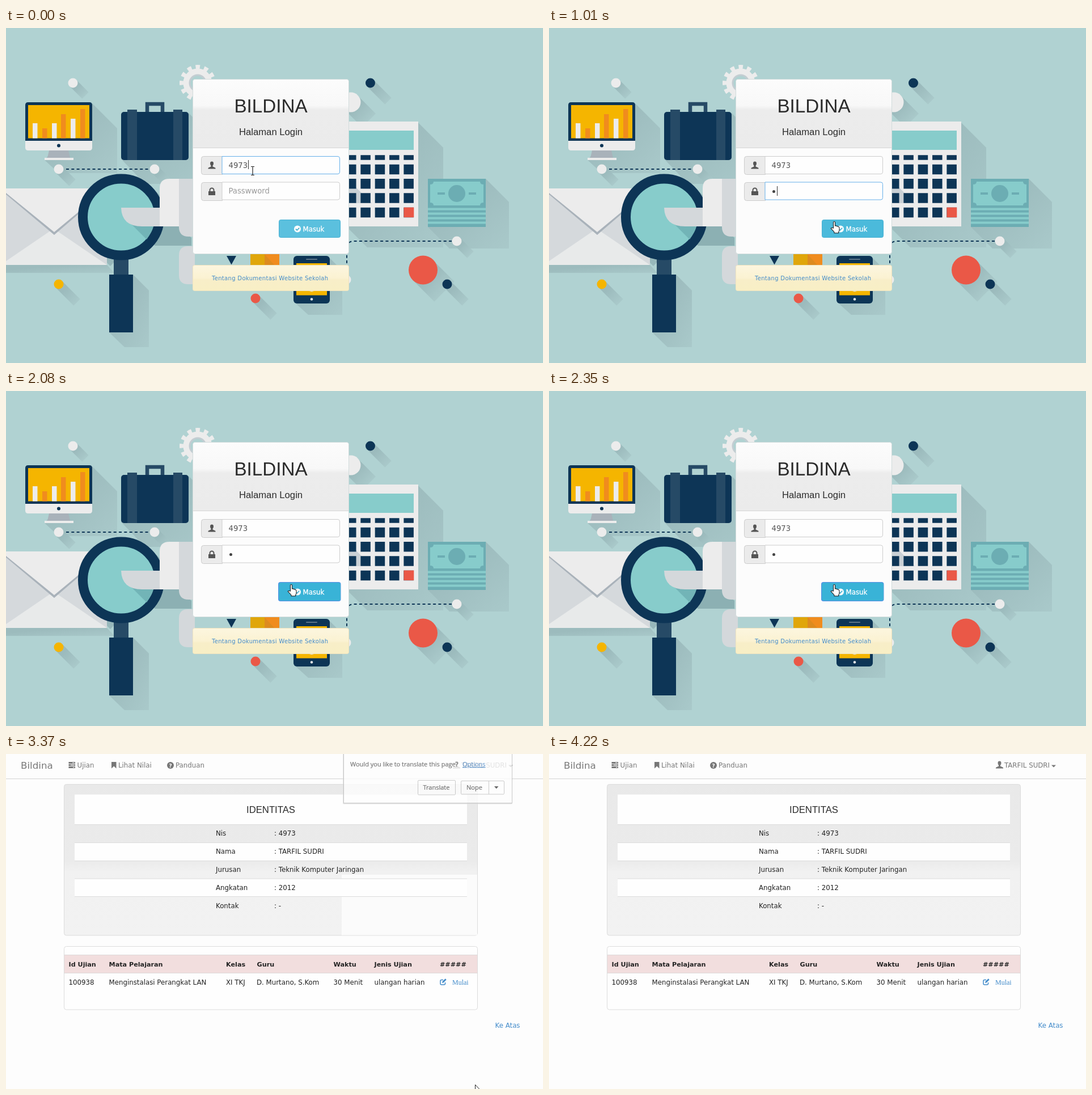
An HTML page that plays this animation: 947x591 px, repeating every 4350 ms.

```html
<!DOCTYPE html>
<html lang="id">
<head>
<meta charset="utf-8">
<title>Halaman Login</title>
<style>
html, body { margin: 0; width: 100%; height: 100%; overflow: hidden; background: #fdfdfd; }
svg { display: block; width: 947px; height: 591px; }
text { font: 11.8px "DejaVu Sans", Verdana, sans-serif; fill: #222; white-space: pre; }
.head { font-family: "Liberation Sans", Arial, sans-serif; text-anchor: middle; fill: #2b2b2b; }
.big { font-size: 33.2px; }
.sub { font-size: 16.7px; }
.field { font-size: 13.2px; fill: #555; }
.hint { fill: #999; }
.link, .link text { fill: #428bca; }
.foot { font-size: 10px; letter-spacing: .32px; }
.nav text { fill: #777; }
.nav .brand { font-size: 16.7px; }
.th text { font-weight: bold; font-size: 11.2px; }
.serif { font: 12px "Liberation Serif", Times, serif; }
.pop text { font: 11px "Open Sans", "Noto Sans", sans-serif; fill: #555; stroke: #555; stroke-width: .2; }
.pop .opt { fill: #4a86c5; stroke: #4a86c5; text-decoration: underline; }
.shade > * { fill: url(#shade); }
.shade .ln { fill: none; stroke: url(#shade); stroke-width: 16; }
.shade .lens { stroke: #97b8bb; stroke-width: 150; }
.box { fill: #fefefe; stroke: #ccc; }

/* every change is a hard cut on one shared clock */
.a { animation: 4350ms step-end infinite; }
.login { animation-name: login; }
.app { animation-name: app; }
.caret1 { animation-name: caret1; }
.caret2 { animation-name: caret2; }
.user { animation-name: user; }
.pass { animation-name: pass; }
.hint { animation-name: hint; }
.dot { animation-name: dot; }
.btn { animation-name: btn; }
.glow { animation-name: glow; }
.beam { animation-name: beam; }
.hand { animation-name: hand; }
.arrow { animation-name: arrow; }
.pop { animation-name: pop; }
.pale { animation-name: pale; }
@keyframes login { 0% { opacity: 1 } 60.45% { opacity: 0 } }
@keyframes app { 0% { opacity: 0 } 60.45% { opacity: 1 } }
@keyframes caret1 { 0% { opacity: 1 } 3.44% { opacity: 0 } }
@keyframes caret2 {
  0% { opacity: 0; transform: none }
  10.57% { opacity: 1; transform: none }
  16.78% { opacity: 1; transform: translate(9px, 0) }
  26.66% { opacity: 0; transform: none }
}
@keyframes user { 0% { stroke: #66afe9 } 10.57% { stroke: #a9c6dc } 13.33% { stroke: #ccc } }
@keyframes pass { 0% { stroke: #ccc } 10.57% { stroke: #7cb8e4 } 13.33% { stroke: #66afe9 } 32.18% { stroke: #a0c4d8 } 47.81% { stroke: #ccc } }
@keyframes hint { 0% { opacity: 1 } 16.78% { opacity: 0 } }
@keyframes dot { 0% { opacity: 0 } 16.78% { opacity: 1 } }
@keyframes btn { 0% { fill: #5bc0de } 23.21% { fill: #4bbadb } 26.66% { fill: #39b3d7 } }
@keyframes glow { 0% { opacity: 0 } 47.81% { opacity: 1 } }
@keyframes beam {
  0% { opacity: 1; transform: translate(435px, 252px) }
  10.57% { opacity: 1; transform: translate(437px, 253px) }
  16.78% { opacity: 0; transform: none }
  20.22% { opacity: 1; transform: translate(460px, 285px) }
  23.21% { opacity: 0; transform: none }
}
@keyframes hand { 0% { opacity: 0 } 23.21% { opacity: 1 } 67.58% { opacity: 0 } }
@keyframes arrow {
  0% { opacity: 0; transform: none }
  67.58% { opacity: 1; transform: translate(536px, 366px) }
  74.02% { opacity: 0; transform: none }
  77.47% { opacity: 1; transform: translate(827px, 583px) }
  80.22% { opacity: 1; transform: translate(845px, 579px) }
  84.59% { opacity: 1; transform: translate(890px, 590px) }
  87.81% { opacity: 0; transform: none }
}
@keyframes pop { 0% { opacity: 0 } 77.47% { opacity: .8 } 80.22% { opacity: 1 } 97.01% { opacity: 0 } }
@keyframes pale { 0% { opacity: 0 } 77.47% { opacity: 1 } 80.22% { opacity: 0 } }
</style>
</head>
<body>
<svg viewBox="0 0 947 591" xmlns="http://www.w3.org/2000/svg">
<defs>
  <linearGradient id="shade" x1="0" y1="0" x2="1" y2="1">
    <stop offset=".3" stop-color="#9cbbbd"/><stop offset="1" stop-color="#a9c9ca"/>
  </linearGradient>
  <linearGradient id="cardHead" x2="0" y2="1">
    <stop stop-color="#fcfcfc"/><stop offset=".38" stop-color="#f8f8f8"/><stop offset=".45" stop-color="#ececec"/><stop offset="1" stop-color="#ebebeb"/>
  </linearGradient>
  <linearGradient id="note" x2="0" y2="1">
    <stop stop-color="#fcf6df"/><stop offset=".5" stop-color="#fbf2d2"/><stop offset=".58" stop-color="#f8eec8"/><stop offset="1" stop-color="#f8efc5"/>
  </linearGradient>
  <linearGradient id="well" x2="0" y2="1">
    <stop stop-color="#e9e9e9"/><stop offset=".51" stop-color="#ebebeb"/><stop offset=".58" stop-color="#f1f1f1"/><stop offset="1" stop-color="#f2f2f2"/>
  </linearGradient>
  <path id="person" d="M-3-3.5a3 3.4 0 0 1 6 0Q3-1 1.5.5V2L6 4q.6.4.6 2H-6.6q0-1.6.6-2l4.5-2V.5Q-3-1-3-3.5z"/>
</defs>

<g class="a login">
  <rect width="947" height="591" fill="#b0d2d2"/>

  <g class="shade">
    <path d="M152 133L196 177V256H93L68 233z"/>
    <path d="M322 150l42 42v83H245L203 231z"/>
    <path d="M0 418H178l13 14H0z"/>
    <path d="M224 435l28 28v100h-43L182 537z"/>
    <path d="M727 167l44 44v176H637l-37-37z"/>
    <path d="M846 266l41 41v82H782l-38-38z"/>
    <path d="M571 406l22 22v78h-60l-22-20z"/>
    <path class="ln" d="M118 97l22 22"/>
    <path class="ln" d="M93 249l24 24"/>
    <path class="ln" d="M262 249l24 24"/>
    <path class="ln" d="M642 97l32 32"/>
    <path class="ln" d="M93 452l32 32"/>
    <path class="ln" d="M440 477l32 32"/>
    <path class="ln" d="M778 452l32 32"/>
    <path class="ln" d="M795 376l24 24"/>
    <path class="ln" d="M735 427l38 38" style="stroke-width:50"/>
    <path class="ln" d="M608 131l32 32" style="stroke-width:34"/>
    <path class="ln lens" d="M203 333l34 34"/>
  </g>

  <!-- dashed links and dots -->
  <g fill="none" stroke="#0d3556" stroke-width="2" stroke-dasharray="5 4.3">
    <path d="M106 249H256"/>
    <path d="M786 376H612Q601 377 601 390V444"/>
  </g>
  <g fill="#ececec">
    <circle cx="118" cy="97" r="8.5"/><circle cx="93" cy="249" r="8.5"/><circle cx="262" cy="249" r="8.5"/>
    <circle cx="795" cy="376" r="8.5"/><circle cx="600" cy="444" r="8.5"/><circle cx="608" cy="131" r="17.5"/>
  </g>
  <g fill="#0d3556"><circle cx="642.5" cy="97" r="8.5"/><circle cx="778" cy="452" r="8.5"/></g>
  <g fill="#ea5847"><circle cx="440" cy="477" r="8.5"/><circle cx="735.5" cy="427" r="25.5"/></g>
  <circle cx="93" cy="452" r="8.5" fill="#f5b500"/>

  <!-- gear -->
  <g fill="none" stroke="#ececec">
    <circle cx="338" cy="97" r="20" stroke-width="11"/>
    <circle cx="338" cy="97" r="28" stroke-width="8" stroke-dasharray="7.33" transform="rotate(-7.5 338 97)"/>
    <circle cx="338" cy="97" r="14" stroke="#c3cdd2" stroke-width="3"/>
  </g>

  <!-- monitor -->
  <path d="M34 199v-63q0-5 5-5H147q5 0 5 5v63z" fill="#0d3556"/>
  <rect x="39" y="136" width="108" height="58.5" fill="#f5b500"/>
  <path d="M47 168h8.5v26.5H47zM81 168h8.5v26.5H81zM114 160h8.5v34.5H114z" fill="#ececec"/>
  <path d="M64 177h8.5v17.5H64zM97 152h8.5v42.5H97zM131 143h8.5v51.5H131z" fill="#f08c1e"/>
  <path d="M34 199H152v12q0 5-5 5H39q-5 0-5-5z" fill="#ececec"/>
  <circle cx="93" cy="207.5" r="3" fill="#0d3556"/>
  <path d="M76 216h34l3 13H73z" fill="#a9b2ba"/>
  <rect x="68" y="229" width="51" height="4" fill="#ececec"/>

  <!-- briefcase -->
  <path d="M249 150V134h27v16" fill="none" stroke="#264a66" stroke-width="6.5"/>
  <rect x="203" y="148" width="119" height="85" rx="5" fill="#0d3556"/>
  <path d="M214 144h17v89h-17zM295 144h16v89h-16z" fill="#264a66"/>

  <!-- envelope -->
  <path d="M0 283H178V418H0z" fill="#d5d9dc"/>
  <path d="M-10 418L84 354l94 64z" fill="#e8eaea"/>
  <path d="M-10 285H178L85 365z" fill="#a9b2ba"/>
  <path d="M-10 283H178L85 360z" fill="#ececec"/>

  <!-- magnifier and hand -->
  <path d="M255 350h50l22 20v14H262z" fill="#8cb0b3"/>
  <rect x="190" y="405" width="26" height="31" fill="#264a66"/>
  <rect x="182" y="435" width="42" height="102" fill="#0d3556"/>
  <circle cx="203" cy="333.5" r="67.5" fill="#87cccb" stroke="#0d3556" stroke-width="17"/>
  <path d="M212 337L248 373Q259 358 261 346z" fill="#72b4b7"/>
  <path d="M203 317h68v33h-31q-36 0-37-33z" fill="#d4d8db"/>
  <path d="M271 350V283q0-17 17-17h42v84z" fill="#ececec"/>
  <path d="M305 266h28v102h-11q-17 0-17-17z" fill="#d4d8db"/>
  <path d="M333 385h-12q-16 0-16 16v35q0 16 16 16h12z" fill="#d4d8db"/>

  <!-- pencil, book, phone -->
  <path d="M389 402h17l-8.500 15.500z" fill="#0d3556"/>
  <path d="M431 396h51v24h-51z" fill="#f5b500"/>
  <path d="M456 396h26v24h-26z" fill="#f08c1e"/>
  <path d="M431 396h22l22 24h-44z" fill="#b88a20" opacity=".35"/>
  <rect x="507" y="402" width="64" height="84" rx="6" fill="#0d3556"/>
  <rect x="512" y="415" width="54" height="56.5" fill="#f5b500"/>
  <rect x="529" y="407" width="20" height="2" rx="1" fill="#5c7488"/>
  <circle cx="539" cy="456" r="9" fill="#ececec"/><circle cx="539" cy="478.5" r="2.3" fill="#ececec"/>

  <!-- calculator -->
  <path d="M590 165H727V350H590z" fill="#ececec"/>
  <path d="M590 181H719V215H590z" fill="#87cccb"/>
  <path d="M604 268L645 309H604z" fill="#c9d0d5"/>
  <g stroke="#0d3556" stroke-width="17.5" stroke-dasharray="17.5 7.85">
    <path d="M600 228.500H719.500" stroke-width="8.5"/>
    <path d="M600 249.500H719.500M600 274.800H719.500M600 300H719.500M600 325.500H719.500"/>
  </g>
  <rect x="701.5" y="316.5" width="17.8" height="17.5" fill="#ea5847"/>
  <path d="M600 264l10 11h-10z" fill="#0d3556"/>

  <!-- banknotes -->
  <path d="M744 266H846v85H744z" fill="#6cadb3"/>
  <path d="M754 271h82q0 5 6 5v32q-6 0-6 5h-82q0-5-6-5v-32q6 0 6-5z" fill="#87cccb"/>
  <circle cx="795" cy="292" r="15" fill="#6cadb3"/>
  <path d="M761 292h13M816 292h13" stroke="#6cadb3" stroke-width="4"/>
  <path d="M744 319.500H846M744 327.500H846M744 335.500H846M744 343.500H846" stroke="#87cccb" stroke-width="4"/>

  <!-- login card -->
  <rect x="329.5" y="90.5" width="275" height="308" rx="4" fill="#fcfcfc" stroke="#d2dcdc"/>
  <path d="M330 211V95q0-4 4-4H600q4 0 4 4V211z" fill="url(#cardHead)"/>
  <path d="M330 211.500H604" stroke="#d6d6d6"/>
  <text class="head big" x="467" y="149">BILDINA</text>
  <text class="head sub" x="467" y="189">Halaman Login</text>

  <path d="M381.500 226.500h-33q-4 0-4 4v24q0 4 4 4h33zM381.500 272.500h-33q-4 0-4 4v24q0 4 4 4h33z" fill="#ebebeb" stroke="#ccc"/>
  <path class="a box user" d="M381 226.500H585q3.500 0 3.500 3.500v24q0 3.500-3.500 3.500H381z"/>
  <path class="a box pass" d="M381 272H585q3.500 0 3.500 3.500v24q0 3.500-3.500 3.500H381z"/>
  <use href="#person" x="363" y="242.5" fill="#555"/>
  <path d="M357 288h12v7h-12z" fill="#555"/>
  <path d="M359.500 289v-3a3.500 3.500 0 0 1 7 0v3" fill="none" stroke="#555" stroke-width="2"/>
  <text class="field" x="392.5" y="246.5">4973</text>
  <path class="a caret1" d="M427.500 233v16" stroke="#333"/>
  <text class="a field hint" x="392.5" y="292">Passwword</text>
  <circle class="a dot" cx="396.5" cy="288.5" r="2.5" fill="#444"/>
  <path class="a caret2" d="M393.500 279v17" stroke="#333"/>

  <rect class="a glow" x="480" y="337" width="110.5" height="34" rx="4" fill="#4d90e8"/>
  <rect class="a btn" x="481.5" y="338.5" width="108" height="31" rx="3" stroke="#46b0d2"/>
  <circle cx="514" cy="354.5" r="6" fill="#fff"/>
  <path d="M511 354.500l2.300 2.300 4-4.300" fill="none" stroke="#45b0d0" stroke-width="1.8"/>
  <text x="523.5" y="359" style="fill:#fff;stroke:#fff;stroke-width:.3">Masuk</text>

  <rect x="329.5" y="418.5" width="275" height="45" rx="3" fill="url(#note)" stroke="#eee3c0"/>
  <text class="link foot" x="363" y="445">Tentang Dokumentasi Website Sekolah</text>
</g>

<g class="a app">
  <rect width="947" height="591" fill="#fdfdfd"/>
  <path d="M0 43.500H947" stroke="#dcdcdc"/><path d="M0 44.500H947" stroke="#f2f2f2"/>
  <g class="nav">
    <text class="brand" x="26" y="26">Bildina</text>
    <path d="M110.500 15.500H122M110.500 19.500H122M110.500 23.500H122" stroke="#777" stroke-width="3"/>
    <path d="M117 15.500h3.500M114 19.500h6.500M118 23.500h2.500" stroke="#fdfdfd"/>
    <text x="125.5" y="24">Ujian</text>
    <path d="M186 14h8.500v11.500l-4.250-4-4.250 4z" fill="#777"/>
    <text x="198" y="24">Lihat Nilai</text>
    <circle cx="290" cy="20" r="6" fill="#777"/>
    <text x="287.3" y="23.5" style="fill:#fdfdfd;font-weight:bold;font-size:9.5px">?</text>
    <text x="299" y="24">Panduan</text>
    <use href="#person" x="794.5" y="19.5" fill="#777"/>
    <text x="803" y="24">TARFIL SUDRI</text>
    <path d="M886 19.500h8l-4 4z" fill="#777"/>
  </g>

  <!-- identity panel -->
  <rect x="102.5" y="53.5" width="729" height="266.5" rx="4" fill="url(#well)" stroke="#dcdcdc"/>
  <path class="a pale" d="M592 213H831V319.500H592z" fill="#fbfbfb"/>
  <path d="M121 71.500H813V124H121zM121 156H813V188H121zM121 220H813V251.500H121z" fill="#fefefe"/>
  <path d="M121 124.500H813M121 156.500H813M121 188.500H813M121 220H813M121 251.500H813" stroke="#dcdcdc"/>
  <text class="head sub" x="467" y="104">IDENTITAS</text>
  <text x="370" y="144">Nis</text><text x="473" y="144">: 4973</text>
  <text x="370" y="176">Nama</text><text x="473" y="176">: TARFIL SUDRI</text>
  <text x="370" y="208">Jurusan</text><text x="473" y="208">: Teknik Komputer Jaringan</text>
  <text x="370" y="240">Angkatan</text><text x="473" y="240">: 2012</text>
  <text x="370" y="272">Kontak</text><text x="473" y="272">: -</text>

  <!-- exam list -->
  <rect x="102.5" y="339.5" width="729" height="111.5" rx="4" fill="#fefefe" stroke="#dcdcdc"/>
  <path d="M103 354H831V386.500H103z" fill="#f2dede"/>
  <path d="M103 354.500H831M103 386.500H831" stroke="#dedada"/>
  <g class="th">
    <text x="110.5" y="374.5">Id Ujian</text><text x="181.5" y="374.5">Mata Pelajaran</text>
    <text x="388" y="374.5">Kelas</text><text x="442.5" y="374.5">Guru</text>
    <text x="577.5" y="374.5">Waktu</text><text x="649.5" y="374.5">Jenis Ujian</text>
    <text x="765" y="374.5">#####</text>
  </g>
  <text x="110.5" y="406.5">100938</text><text x="181.5" y="406.5">Menginstalasi Perangkat LAN</text>
  <text x="388" y="406.5">XI TKJ</text><text x="442" y="406.5">D. Murtano, S.Kom</text>
  <text x="577.5" y="406.5">30 Menit</text><text x="649.5" y="406.5">ulangan harian</text>
  <path d="M771 398.500h-3q-2 0-2 2v4.500q0 2 2 2h4.500q2 0 2-2v-2" fill="none" stroke="#428bca" stroke-width="1.5"/>
  <path d="M769 404l.7-2.700 5-5 2 2-5 5z" fill="#428bca"/>
  <text class="link serif" x="787" y="407">Mulai</text>
  <text class="link" x="862.5" y="482.5">Ke Atas</text>
</g>

<!-- translate prompt -->
<g class="a pop">
  <path d="M594 0V87q0 1.500 2 1.500H891q2 0 2-1.500V0z" fill="#ddd"/>
  <path d="M595.500-1V86.500H892.500V-1z" fill="#fefefe" stroke="#bbb"/>
  <text x="607" y="22">Would you like to translate this page?</text>
  <text class="opt" x="805" y="22">Options</text>
  <g fill="#fdfdfd" stroke="#bfbfbf">
    <rect x="726.5" y="46.5" width="66" height="25.5" rx="1.5"/>
    <rect x="802.5" y="47.5" width="76" height="23.5" rx="1.5"/>
    <path d="M851.500 47.500v23.500"/>
  </g>
  <text x="735.5" y="63">Translate</text>
  <text x="812" y="63">Nope</text>
  <path d="M861 57h7.500l-3.750 4.300z" fill="#444"/>
</g>

<!-- pointers -->
<path class="a beam" d="M-3-7.500h2.500l.5.500.5-.500H3M0-7V7M-3 7.500h2.500l.5-.500.5.500H3" fill="none" stroke="#222" stroke-width="1.2"/>
<g class="a hand">
  <path transform="translate(496.5 341)" d="M5 12V2a1.500 1.500 0 0 1 3 0v6q2.500-1 2.700.8 2.300-.8 2.600 1 2.200-.5 2.200 1.400v4q0 2-1.500 4v1.500H6.500V19Q5 17 1 13.200q-.6-1.700 1.300-1.700z" fill="#fff" stroke="#222" stroke-width="1.1"/>
</g>
<path class="a arrow" d="M.5.500V15.500l3.500-3.200 2.500 5.200 2.200-1L6.300 11.500H11z" fill="#fff" stroke="#222"/>
</svg>
</body>
</html>
```
